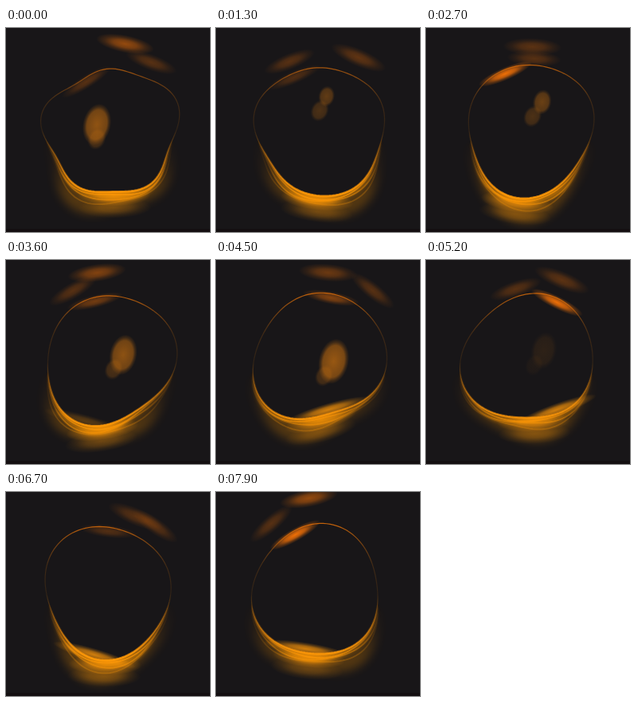
These frames come from a looping animation (256 px wide and 256 px high, 8000 ms). An HTML page:

```html
<!DOCTYPE html>
<html lang="en">
<head>
<meta charset="utf-8">
<title>Ember orb</title>
<style>
  html, body { margin: 0; width: 100%; height: 100%; overflow: hidden; background: #181618; }
  svg { display: block; width: 100vw; height: 100vh; }
</style>
</head>
<body>
<svg id="stage" viewBox="0 0 256 256">
  <defs>
    <linearGradient id="edge" gradientUnits="userSpaceOnUse" x1="0" y1="0" x2="0" y2="256">
      <stop offset=".15" stop-color="#ff7c05" stop-opacity=".75"/>
      <stop offset=".25" stop-color="#f57c0a" stop-opacity=".45"/>
      <stop offset=".36" stop-color="#e07a10" stop-opacity=".2"/>
      <stop offset=".5" stop-color="#d87e12" stop-opacity=".12"/>
      <stop offset=".62" stop-color="#f58e0c" stop-opacity=".5"/>
      <stop offset=".8" stop-color="#ff9c0c" stop-opacity="1"/>
    </linearGradient>
    <linearGradient id="fire" gradientUnits="userSpaceOnUse" x1="0" y1="0" x2="0" y2="256">
      <stop offset=".55" stop-color="#f08a08" stop-opacity="0"/>
      <stop offset=".68" stop-color="#f89008" stop-opacity=".35"/>
      <stop offset=".81" stop-color="#ff9806" stop-opacity="1"/>
    </linearGradient>
  </defs>
  <rect width="256" height="256" fill="#181618"/>
  <rect y="252" width="256" height="4" fill="#140f11"/>
</svg>
<script>
const LOOP = 8000, STEP = 100, CX = 130, CY = 130, TAU = Math.PI * 2;
const { sin, cos, exp, max, min, atan2 } = Math;

const svg = document.getElementById("stage");
const defs = svg.querySelector("defs");

function set(node, attrs) {
  for (const name in attrs) node.setAttribute(name, attrs[name]);
}

function add(tag, attrs, parent = svg) {
  const node = document.createElementNS("http://www.w3.org/2000/svg", tag);
  set(node, attrs);
  parent.append(node);
  return node;
}

function blur(size) {
  const id = `blur${String(size).replace(".", "-")}`;
  const filter = add("filter", { id, filterUnits: "userSpaceOnUse", x: 0, y: 0, width: 256, height: 256 }, defs);
  add("feGaussianBlur", { stdDeviation: size }, filter);
  return `url(#${id})`;
}

// Radial fade; a larger plateau gives a firmer edge.
function softFill(id, color, plateau) {
  const gradient = add("radialGradient", { id }, defs);
  [[0, 1], [plateau, .75], [(1 + plateau) / 2, .3], [1, 0]].forEach(([offset, opacity]) =>
    add("stop", { offset, "stop-color": color, "stop-opacity": opacity }, gradient));
  return `url(#${id})`;
}

const fine = blur(.6), soft = blur(2), wide = blur(6);
const red = softFill("red", "#fa7406", .4);
const amber = softFill("amber", "#c87010", .7);
const gold = softFill("gold", "#ff980a", .4);

const patch = fill => add("ellipse", { fill });
const layer = attrs => add("path", { fill: "none", ...attrs });

const halo = layer({ fill: "url(#fire)", opacity: .25, filter: wide });
const crown = patch(red), drift = patch(red), ember = patch(gold), base = patch(gold);
const glow = layer({ fill: "url(#fire)", opacity: .5, filter: soft });
const strands = [4, 8, 13].map((offset, i) => ({
  offset,
  node: layer({ stroke: "url(#fire)", "stroke-width": 1.8, opacity: .7 - i * .22, filter: fine })
}));
const inside = layer({ fill: "#181618", filter: fine });
const rim = patch(red), wisp = patch(amber), core = patch(amber), vein = patch(gold);
const edge = layer({ stroke: "url(#edge)", "stroke-width": 1.2, filter: fine });
const hotEdge = layer({ stroke: "url(#fire)", "stroke-width": 3, opacity: .75, filter: fine });

// Cosine with the given period that peaks at `peak` (seconds).
const wave = (t, period, peak = 0) => cos(TAU * (t - peak) / period);
const pulse = (t, center, width) => exp(-(((t - center) / width) ** 2));
const ramp = (t, from, to) => {
  const u = min(1, max(0, (t - from) / (to - from)));
  return u * u * (3 - 2 * u);
};

// Membrane: a drift, a wobbling ellipse, a quickening three-lobed wave
// and a five-lobed one that dies away. Angle a runs clockwise from the top.
function radius(a, t) {
  const lift = 1 + .6 * t + 4.5 * pulse(t, 4.5, 1);
  const lean = 2.5 - .85 * t;
  const turn = 2.65 - .17 * t + .19 * t * t;
  return 80.5
    + lift * cos(a) + lean * sin(a)
    + 3.3 * wave(t, 4.6, 2.45) * cos(2 * a)
    + (1.9 - 3.5 * wave(t, 5.6, 1.2)) * sin(2 * a)
    + 3.6 * cos(3 * a - turn)
    + 4 * exp(-t / 1.2) * cos(5 * a + .35);
}

function pointAt(a, t, offset = 0) {
  const r = radius(a, t) + offset;
  return [CX + r * sin(a), CY - r * cos(a)];
}

// The offset grows toward the bottom of the ring.
function ring(t, offset = 0) {
  const points = [];
  for (let i = 0; i < 128; i++) {
    const a = i / 128 * TAU;
    const low = max(0, -cos(a)) ** 1.3;
    const ripple = 1 + .25 * sin(4 * a + t * 2.9 + offset);
    points.push(pointAt(a, t, offset * low * ripple).map(v => v.toFixed(2)).join(" "));
  }
  return `M${points.join("L")}Z`;
}

function place(node, cx, cy, rx, ry, angle, opacity) {
  set(node, { cx, cy, rx, ry, opacity, transform: `rotate(${angle} ${cx} ${cy})` });
}

// Lays a patch along the membrane at an angle in degrees.
function ride(node, t, degrees, offset, rx, ry, opacity) {
  const a = degrees / 360 * TAU;
  const [x1, y1] = pointAt(a - .15, t);
  const [x2, y2] = pointAt(a + .15, t);
  const tilt = atan2(y2 - y1, x2 - x1) * 360 / TAU;
  place(node, ...pointAt(a, t, offset), rx, ry, tilt, opacity);
}

function render(t) {
  const outline = ring(t);
  for (const node of [inside, edge, hotEdge]) set(node, { d: outline });
  set(halo, { d: ring(t, 25) });
  set(glow, { d: ring(t, 9) });
  for (const { node, offset } of strands) set(node, { d: ring(t, offset) });

  const flicker = wave(t, 1.97);
  ride(crown, t, 10 + 18 * sin(TAU * t / 4.7), 27 + 6 * flicker, 37, 11, .4 + .15 * flicker);

  const swing = wave(t, 2.35, 4.5);
  ride(drift, t, 36 * swing, 8 + 18 * swing * swing, 34, 10, .28);

  const roll = 183 + 7 * wave(t, 5.2, 2.7);
  ride(ember, t, roll, 20, 46, 13, .3);
  ride(base, t, roll, 5, 46, 13, .75);

  const flare = (.6 + .35 * wave(t, 2.6, 2.7)) * min(1, .3 + t / 2);
  ride(rim, t, -25 + 50 * pulse(t, 5.4, 1.5), -5, 36, 8, flare);

  const breath = wave(t, 4.9, 4.3);
  const fade = 1 - ramp(t, 4.7, 5.4);
  const x = 148 - 34 * exp(-t), y = 104 + 24 * breath;
  place(core, x, y, 14 + 5 * breath, 20 + 9 * breath, 12, (.55 + .18 * breath) * fade);
  place(wisp, x - 12 * ramp(t, 0, 2), y + 18, 11, 14, 25, .3 * fade);

  ride(vein, t, 178 + 28 * wave(t, 4, 7.3), -5, 54, 8, .8 * ramp(t, 3, 4.5));
}

const start = performance.now();
function tick() {
  const elapsed = (performance.now() - start) % LOOP;
  render(Math.floor(elapsed / STEP) * STEP / 1000);
  requestAnimationFrame(tick);
}
tick();
</script>
</body>
</html>
```
